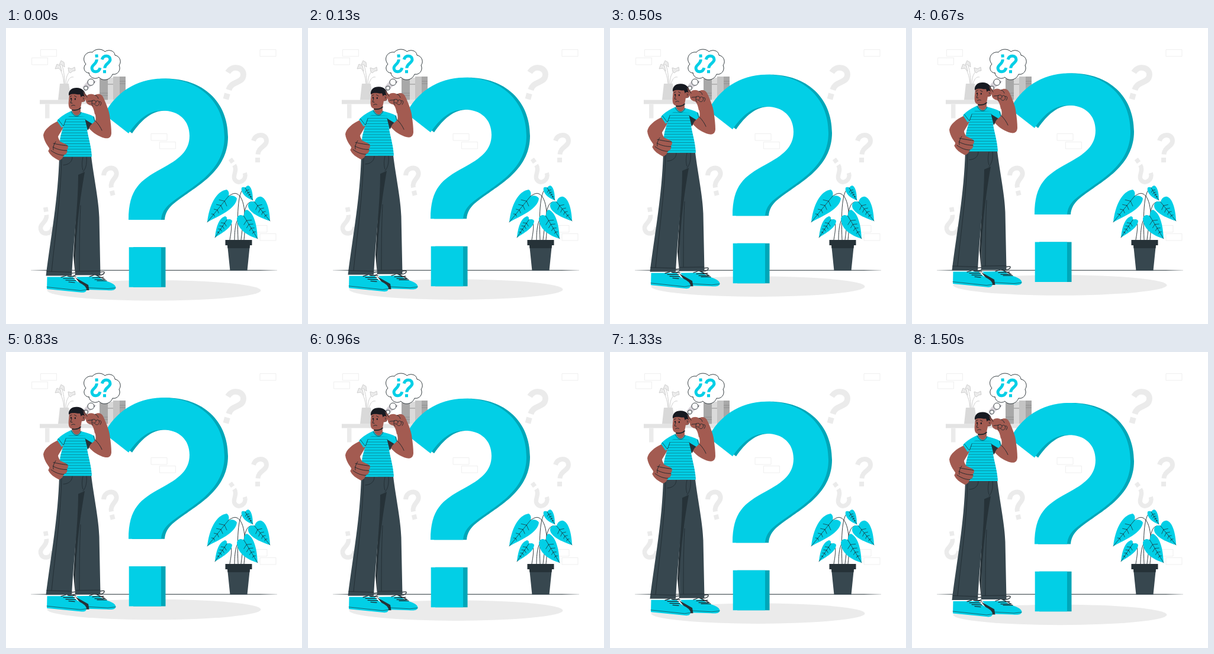
Animation, 500 px wide and 500 px high, one loop 1.54 s. Source, as an HTML page:

```html
<!DOCTYPE html>
<html lang="en">
<head>
<meta charset="utf-8">
<title>Thinking man</title>
<style>
  html, body { margin: 0; height: 100%; overflow: hidden; background: #fff; }
  svg { display: block; width: 100vw; height: 100vh; }
  .line { fill: none; stroke: #1c262b; stroke-width: .9; stroke-linecap: round; stroke-linejoin: round; }
  .brick { fill: none; stroke: #ebebeb; stroke-width: .8; }
  .pale { color: #ebebeb; }
  .cyan { color: #02cfe6; fill: #02cfe6; }
  .deep { fill: #00a6b8; }
  .skin { fill: #a35b51; }
  .dark { fill: #263238; }
  .cloth { fill: #37474f; }
</style>
</head>
<body>
<svg viewBox="0 0 500 500">
  <defs>
    <g id="mark">
      <path d="M-11-11.500C-9-18-4-21 1-21C8-21 11-16.500 11-11C11-2-3-1-3.500 11.500" fill="none" stroke="currentColor" stroke-width="8"/>
      <rect x="-8" y="17" width="8" height="8" fill="currentColor"/>
    </g>
    <path id="hook" d="M207 178L166 146C183 112 218 85.500 264 85.500C326 85.500 369 124 369 184C369 236 325 262 300 280C275 297 264 305 262 324H207C207 272 227 257 262 238C292 222 310 208 310 182C310 156 292 139.500 264 139.500C240 139.500 223 155 207 178Z"/>
    <path id="brick" class="brick" d="M0 0h27v11.500h-27z"/>
    <pattern id="stripes" width="8" height="4.600" patternUnits="userSpaceOnUse">
      <path d="M0 2.300h8" stroke="#0a7c8c" stroke-width=".8"/>
    </pattern>
    <linearGradient id="fade" gradientUnits="userSpaceOnUse" x1="42" x2="458" y1="0" y2="0">
      <stop offset="0" stop-color="#263238" stop-opacity=".2"/>
      <stop offset=".07" stop-color="#263238"/>
      <stop offset=".93" stop-color="#263238"/>
      <stop offset="1" stop-color="#263238" stop-opacity=".2"/>
    </linearGradient>
  </defs>

  <use href="#brick" x="58.500" y="36.500"/>
  <use href="#brick" x="43.500" y="50.500"/>
  <use href="#brick" x="429" y="36.500"/>
  <use href="#brick" x="245" y="178.500"/>
  <use href="#brick" x="259.500" y="192.500"/>
  <use href="#brick" x="414" y="333.500"/>
  <use href="#brick" x="429" y="347.500"/>

  <g class="pale">
    <use href="#mark" transform="translate(384 92) rotate(15) scale(1.22)"/>
    <use href="#mark" transform="translate(429 202)"/>
    <use href="#mark" transform="translate(178.500 257.500) rotate(-14)"/>
    <use href="#mark" transform="translate(389 242) rotate(145) scale(.92)"/>
    <use href="#mark" transform="translate(67 327) rotate(170) scale(.95)"/>
  </g>

  <!-- shelf, books, vase -->
  <path d="M57 121.500h145v7H57z" fill="#e3e3e3"/>
  <path d="M66 128.500h7.500v24H66z" fill="#ebebeb"/>
  <path d="M158 82h14v39.500h-14zM192 82h10v39.500h-10z" fill="#a8a8a8"/>
  <path d="M172 84h9v37.500h-9z" fill="#dadada"/>
  <path d="M181 82h11v39.500h-11z" fill="#c4c4c4"/>
  <path d="M158 110h14M158 114h14M172 95h9M192 90h10M192 94h10" stroke="#8f8f8f"/>
  <path d="M91 94h15l4 27.500H88z" fill="#d9d9d9"/>
  <g fill="none" stroke="#cfcfcf">
    <path d="M98 94C97 80 93 72 88 63M99 94C99 80 97 70 94 60M101 94C101 84 104 76 110 71M103 94C106 84 110 82 114 83"/>
    <path d="M83 69l3-8 6 3 2 9-5-5zM90 62l3-7 5 3 1 8-5-4zM106 74l-1-7 6 2 5-3 1 6-5 1-3 3z" fill="#ececec"/>
  </g>

  <path d="M42 409.300H458" stroke="url(#fade)" stroke-width="1" transform="rotate(.001)"/>

  <!-- potted plant -->
  <path class="line" stroke-width="1.200" d="M402 358C406 322 404 286 390 280C385 278 381 281 376 284M392 358C390 310 392 272 404 270M397 358C403 310 402 290 420 294M378 358C381 340 384 324 373 324M386 358C386 335 390 314 402 318"/>
  <g class="cyan">
    <path d="M340 328C343 300 355 275 373 273C377 276 377 280 376 284C382 282 388 284 390 288C388 306 360 317 340 328Z"/>
    <path d="M446 326C424 319 408 309 409 299C410 293 416 292 420 294C421 288 426 284 431 285C440 288 445 305 446 326Z"/>
    <path d="M417 291C405 287 396 278 398 270C400 268 403 269 404 270C406 267 409 265 411 267C416 272 417 282 417 291Z"/>
    <path d="M353 354C355 335 360 321 370 318C374 319 373 322 373 324C377 322 381 323 382 326C381 338 365 346 353 354Z"/>
    <path d="M425 356C406 350 391 340 390 322C391 316 397 314 402 318C402 312 403 308 407 307C418 312 424 330 425 356Z"/>
  </g>
  <g id="veins" class="line" style="stroke-width:.7"></g>
  <path class="cloth" d="M374 366h38l-4.500 44h-29z"/>
  <path class="dark" d="M370.500 358h45v9h-45zM374 367h38l-.5 5h-37z"/>

  <!-- thought bubble -->
  <path d="M129 100L140 87L153 90L133 107Z" fill="#d6d2d8"/>
  <g class="line" style="fill:#fff">
    <path d="M140 76C132 76 129 66 135 61C127 52 134 39 146 41C151 34 163 35 167 40C174 35 184 39 184 46C192 47 196 57 191 63C195 71 188 80 180 78C176 89 162 90 157 83C151 88 141 84 140 76Z"/>
    <circle cx="143.500" cy="91.500" r="5.500"/>
    <circle cx="135" cy="101.500" r="3.500"/>
  </g>
  <g class="cyan">
    <use href="#mark" transform="translate(169 60.500) scale(.63)"/>
    <use href="#mark" transform="translate(151.500 60.500) rotate(176) scale(.63)"/>
  </g>

  <g id="floating">
    <ellipse cx="250" cy="443.300" rx="180.500" ry="17.300" fill="#ebebeb"/>

    <use href="#hook" class="deep" x="6"/>
    <use href="#hook" class="cyan"/>
    <path class="deep" d="M215 370.300h54.500v67.500H215z"/>
    <path class="cyan" d="M207.700 370.300H262v67.500h-54.300z"/>

    <!-- shoes -->
    <path class="cyan" d="M119 420.500L157 420C163 428 184 429 185.500 438C185 444 178 443.500 170 443L136 442Z"/>
    <path class="dark" d="M117 421.500L139 434L140.500 443L134 443Z"/>
    <path class="cyan" d="M69.500 420.500H113C118 430 134 432 136 441C136 446.500 132 447.500 125 446.500L69 441Z"/>
    <path class="line" style="stroke-width:.6" d="M69 437.500L126 443.500L136 442M137 438.500L172 440.500L185 439"/>
    <path class="line" style="stroke-width:1.200" d="M93 421C103 419 110 412 118 414C119 419 110 421 104 419L118 420M97 423L116 423M101 426L118 426.500M106 429L116 430M141 420C150 418 157 410 166 412C167 417 157 419 151 417L166 424M146 422L165 421M150 425L168 425M154 427L170 427"/>

    <!-- trousers -->
    <path class="cloth" d="M118 217H144C148 250 157 293 157.500 320L159.500 417.500H117L119 300Z"/>
    <path class="dark" d="M122 247L133 243C127 278 121 318 118 370L117 417L114 385Z"/>
    <path class="cloth" d="M90 217H138L131 244L122 248C122 300 114 360 111 418.500H67.500C76 350 88 290 90 217Z"/>
    <path class="line" style="stroke-width:.7" d="M112 218C112 226 106 231 97 231.500M130 218C128 227 128 234 130 240M136 218C137 231 134 239 130 243M94 222C92 290 83 350 77 411M68.500 411L111 412.500M118 411L159 410.500M126 300C124 340 124 375 124 410"/>

    <!-- hip arm and torso -->
    <path class="skin" d="M88 157C75 163 64 172 63 181C64 192 72 201 76 207L90 198L92 192C89 188 88 185 88 183L97 168Z"/>
    <path class="skin" d="M112 130H126V145C122 154 114 152 111 143Z"/>
    <path id="shirt" class="cyan" d="M111 140C115 149 122 151 126 142C134 144 142 146 149 150L151 158L143 164L137 172C139 185 144 200 145 217.500H92L91 193C91 183 95 174 97 165L94 168.500L86 156.500C93 149 101 144 111 140Z"/>
    <path fill="url(#stripes)" d="M109 148L134 150L137 172C139 185 144 200 145 217.500H92L91 193C91 183 95 174 97 165L101 152Z"/>
    <path class="line" style="stroke-width:.7" d="M110 141C115 151 123 152 127 142M88.500 155L97 166L101 155M148 150L150 158"/>
    <path class="dark" d="M133.500 154.500L146 162L138 173Z"/>
    <path class="skin" d="M72 207C75 197 81 190 88 190.500C94 193 104 197 105 200C105 203 104 205 102.500 206L103.500 208C103 212 101 214 97.500 214.500C97 219 93 223.500 89 223.500C82 220 74 215 71 207Z"/>
    <path class="line" d="M80 195C85 196 94 198 104 199M79 201C86 205 94 207 103 207M76 207C83 212 90 215 98 215M84 192C81 196 79 202 80 206"/>

    <!-- head -->
    <path class="skin" d="M107 109C107 119 104 129 107 135C110 140 121 139 126 135L128 125C132 126 135 122 134 118L132 109L120 104Z"/>
    <path fill="#171a21" d="M106 114C105 105 112 100.500 120 101C128 101.500 133 106 134 112L133 124L128 124L127 118L125 112C119 113 112 109 106 114Z"/>
    <ellipse class="skin" cx="130" cy="119.500" rx="3.700" ry="4.500"/>
    <path class="line" d="M108 116L111 114.500M115.500 114.500L119 116.500M111 121L109 126.500L112 127M110.500 131.500C112 130 115 130 116.500 131M130 118C131.500 117.500 132 119 130.500 121"/>
    <path class="line" style="stroke-width:1.700" d="M112 138.500C118 139.500 123 138 126 135"/>
    <ellipse cx="110" cy="119.500" rx="1.100" ry="1.700" fill="#171a21"/>
    <ellipse cx="116.800" cy="120" rx="1.100" ry="1.700" fill="#171a21"/>

    <!-- raised arm -->
    <path class="skin" d="M143 164L151 157C153 149 149 141 147 133L165 119C171 132 175 143 175.500 151C177 160 178 170 178 178C177 188 170 187 163 185C152 181 144 174 140 169Z"/>
    <path class="skin" d="M130 107L137 114C141 110.500 147 111 150 113.500C156 110 162 111 165 119L170 133L150 146C149 140 148 135 144 131C139 130 135 127 135 123Z"/>
    <path class="line" d="M131 109L137 117M138 124C140 123 144 124 146 123C144 127 145 130 147 132M145 123C149 121 152 122 152 126C150 129 147 129 146 127M152 124C156 121 159 125 157 129C155 132 152 132 150 129M157 125C161 122 162 128 159 131M150 113.500C153 114 155 116 156 119M151 157C156 162 160 168 162 173"/>
  </g>
</svg>
<script>
  // Each leaf: tip x, tip y, base x, base y, half width
  const leaves = [
    [340, 328, 376, 284, 11], [446, 326, 420, 294, 9], [417, 291, 404, 270, 5],
    [353, 354, 373, 324, 7], [425, 356, 402, 318, 10]
  ];
  const vein = ([tx, ty, bx, by, width]) => {
    const length = Math.hypot(bx - tx, by - ty);
    const ux = (bx - tx) / length, uy = (by - ty) / length;
    let d = `M${tx} ${ty}L${bx} ${by}`;
    for (let k = .3; k < .95; k += .17) {
      const x = tx + (bx - tx) * k, y = ty + (by - ty) * k, w = width * Math.min(1, k * 1.3) * .75;
      for (const side of [-1, 1]) {
        d += `M${x} ${y}l${-ux * w * .5 - uy * w * side} ${-uy * w * .5 + ux * w * side}`;
      }
    }
    return `<path d="${d}"/>`;
  };
  document.getElementById('veins').innerHTML = leaves.map(vein).join('');

  const LOOP = 1540, FPS = 24, MIDDLE = 17.5, STEP = 10 / 18;
  const floating = document.getElementById('floating');
  function draw() {
    const time = performance.now() % LOOP;
    const tick = Math.min(36, Math.floor((time + 5) * FPS / 1000));
    const rise = (MIDDLE - Math.abs(tick - MIDDLE)) * STEP;
    floating.setAttribute('transform', `translate(0 ${-rise})`);
    requestAnimationFrame(draw);
  }
  draw();
</script>
</body>
</html>
```
